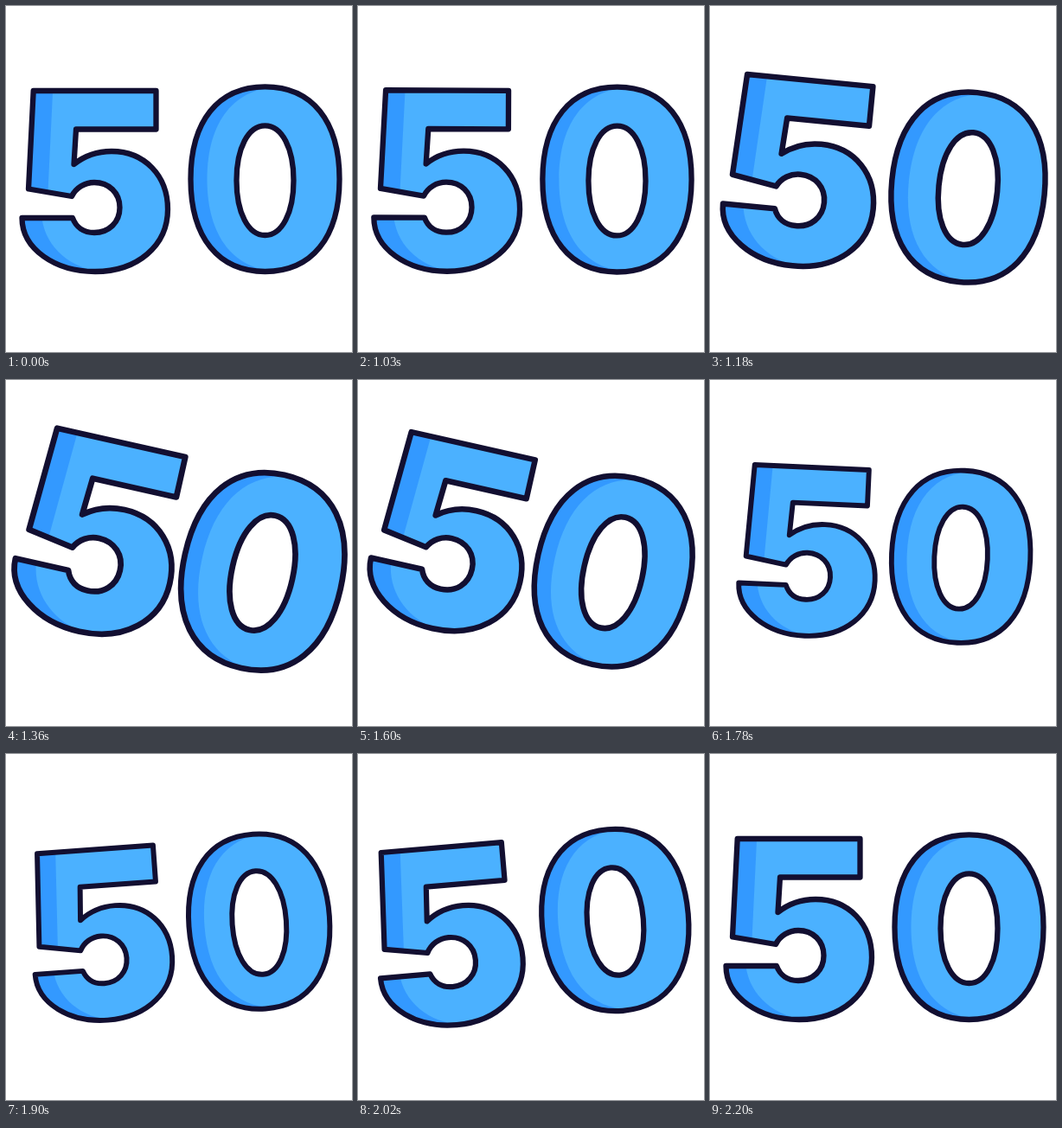
Write an HTML page with a canvas that moves like this. It is 400 by 400 pixels and loops after 2230 ms.

```html
<!DOCTYPE html>
<html lang="en">
<head>
<meta charset="utf-8">
<title>Wobbling 50</title>
<style>
html, body { margin: 0; width: 100%; height: 100%; overflow: hidden; background: #fff; }
canvas { display: block; width: 100vw; height: 100vh; }
</style>
</head>
<body>
<canvas></canvas>
<script>
const LOOP = 2230, START = 1030, STEP = 30;
const LIGHT = '#4bb1ff', SHADE = '#3399ff', INK = '#120f31';
const PIVOT = { x: 200.75, y: 201 };

const canvas = document.querySelector('canvas');
const ctx = canvas.getContext('2d');

// Closed oval; a higher bulge makes it squarer than an ellipse.
function oval(path, x, y, rx, ry, bulge) {
  const bx = rx * bulge, by = ry * bulge;
  path.moveTo(x, y - ry);
  path.bezierCurveTo(x + bx, y - ry, x + rx, y - by, x + rx, y);
  path.bezierCurveTo(x + rx, y + by, x + bx, y + ry, x, y + ry);
  path.bezierCurveTo(x - bx, y + ry, x - rx, y + by, x - rx, y);
  path.bezierCurveTo(x - rx, y - by, x - bx, y - ry, x, y - ry);
  path.closePath();
}

const five = {
  x: 102, y: 202,
  body: new Path2D(`M31.7 98H173.5V142.5H81L78.5 183
    C91 173 106 168 122 168C160 168 187 196 187 235
    C187 277 152 307 103 307C57 307 18.5 281 18.5 245
    H77C81 256 90 262 102 262C119 262 131.5 250 131.5 233
    C131.5 216 119 204 102 204C91 204 81 210 76 220L26 211.5Z`),
  lit: new Path2D('M54.5 90L48 225L41 240C43 275 70 302 110 307.5L200 330V90Z')
};

const zero = { x: 299.5, y: 200.2, body: new Path2D(), lit: new Path2D() };
oval(zero.body, 299.5, 200.2, 86, 106.8, 0.63);
oval(zero.body, 299.5, 201.7, 33, 63.3, 0.59);
oval(zero.lit, 318.5, 200.2, 86, 106.8, 0.63);

// Smooth 0 to 1 between two times.
function ease(t, from, to) {
  const u = Math.min(1, Math.max(0, (t - from) / (to - from)));
  return u * u * (3 - 2 * u);
}

function poseAt(t) {
  const degrees = 13 * ease(t, 1000, 1400) - 18 * ease(t, 1570, 1950) + 5 * ease(t, 2000, 2200);
  const size = 1 + 0.075 * ease(t, 1000, 1420) - 0.145 * ease(t, 1490, 1805) + 0.07 * ease(t, 1800, 2115);
  const gather = ease(t, 1000, 1360) - ease(t, 1370, 2110);
  return {
    angle: degrees * Math.PI / 180,
    size,
    spread: size * (1 - 0.088 * gather),
    drift: 1.8 * gather
  };
}

function drawDigit(digit, pose) {
  ctx.save();
  ctx.translate(PIVOT.x + pose.drift, PIVOT.y);
  ctx.rotate(pose.angle);
  ctx.translate((digit.x - PIVOT.x) * pose.spread, (digit.y - PIVOT.y) * pose.spread);
  ctx.scale(pose.size, pose.size);
  ctx.translate(-digit.x, -digit.y);
  ctx.fillStyle = SHADE;
  ctx.fill(digit.body, 'evenodd');
  ctx.save();
  ctx.clip(digit.body, 'evenodd');
  ctx.fillStyle = LIGHT;
  ctx.fill(digit.lit);
  ctx.restore();
  ctx.strokeStyle = INK;
  ctx.lineWidth = 6.3;
  ctx.lineJoin = 'round';
  ctx.stroke(digit.body);
  ctx.restore();
}

function frame() {
  const now = performance.now() % LOOP;
  const t = now < START ? 0 : START + Math.floor((now - START) / STEP) * STEP;
  const ratio = window.devicePixelRatio || 1;
  const width = Math.round(innerWidth * ratio), height = Math.round(innerHeight * ratio);
  if (canvas.width !== width || canvas.height !== height) {
    canvas.width = width;
    canvas.height = height;
  }
  ctx.setTransform(width / 400, 0, 0, height / 400, 0, 0);
  ctx.fillStyle = '#fff';
  ctx.fillRect(0, 0, 400, 400);
  const pose = poseAt(t);
  drawDigit(five, pose);
  drawDigit(zero, pose);
  requestAnimationFrame(frame);
}
frame();
</script>
</body>
</html>
```
